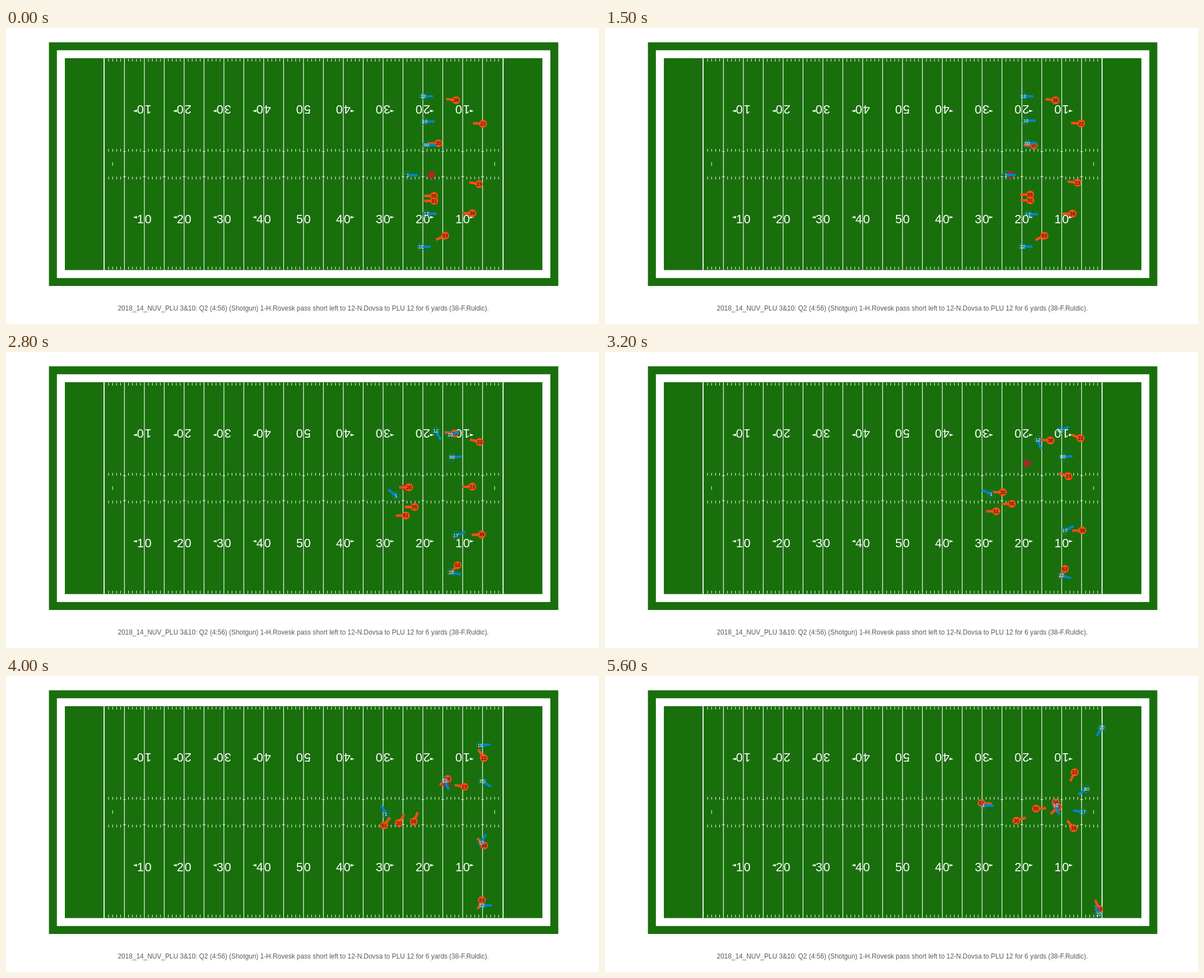
These frames come from a looping animation (1058x529 px, 5.7 s). An HTML page:

```html
<!DOCTYPE html>
<html lang="en">
<head>
<meta charset="utf-8">
<title>Play animation</title>
<style>
  html, body { margin: 0; width: 100%; height: 100%; overflow: hidden; background: #fff; }
  svg { display: block; width: 100vw; height: 100vh; }
  text { font-family: "Liberation Sans", Arial, sans-serif; text-anchor: middle; }
</style>
</head>
<body>
<svg id="stage" viewBox="0 0 1058 529"></svg>
<script>
const LOOP = 5700, STEP = 100;
const GREEN = '#196f0c', ORANGE = '#fb4f14', BLUE = '#0085ca', BROWN = '#a52a2a';
const stage = document.getElementById('stage');

function add(parent, tag, attrs = {}, label) {
  const el = document.createElementNS('http://www.w3.org/2000/svg', tag);
  for (const key in attrs) el.setAttribute(key, attrs[key]);
  if (label !== undefined) el.textContent = label;
  parent.append(el);
  return el;
}

// ---- Field, measured in yards from its centre ----
const YARD = 7.1, MID_X = 531, MID_Y = 243.3;
const HALF_LENGTH = 60 * YARD, HALF_WIDTH = 80 / 3 * YARD;
const TOP = MID_Y - HALF_WIDTH, BOTTOM = MID_Y + HALF_WIDTH;
const yardX = yard => MID_X + (yard - 50) * YARD;

function drawGround() {
  for (const [margin, fill] of [[4, GREEN], [2, '#fff'], [0, GREEN]]) {
    const w = HALF_LENGTH + margin * YARD, h = HALF_WIDTH + margin * YARD;
    add(stage, 'rect', { x: MID_X - w, y: MID_Y - h, width: 2 * w, height: 2 * h, fill });
  }
}

function drawLines() {
  const full = x => `M${x} ${TOP}V${BOTTOM}`;
  const tick = 4.8, hash = 22.4;
  let lines = '', ticks = '';
  for (let yard = 1; yard < 100; yard++) {
    const x = yardX(yard);
    if (yard % 5 === 0) {
      lines += full(x - .2);
      ticks += `M${x - 2.7} ${MID_Y - hash}h5M${x - 2.7} ${MID_Y + hash}h5`;
    } else {
      for (const y of [TOP + 1.2, MID_Y - hash - tick, MID_Y + hash, BOTTOM - tick - 1.2])
        ticks += `M${x} ${y}v${tick}`;
    }
  }
  for (const yard of [2, 98]) ticks += `M${yardX(yard)} ${MID_Y - 3.2}v6.4`;
  const stroke = (d, width) => add(stage, 'path', { d, stroke: '#fff', 'stroke-width': width });
  stroke(full(yardX(0) - 1) + full(yardX(100) + .8), 1.8);
  stroke(lines, 1.15);
  stroke(ticks, 1);
}

function drawNumbers() {
  for (let yard = 10; yard <= 90; yard += 10) {
    const label = String(Math.min(yard, 100 - yard));
    const side = Math.sign(yard - 50);
    for (const turn of [0, 180]) {
      const g = add(stage, 'g', { fill: '#fff', transform: `translate(${yardX(yard) - .3} ${MID_Y}) rotate(${turn})` });
      [...label].forEach((digit, i) =>
        add(g, 'text', { x: i ? 6.9 : -6.9, y: 105.6, 'font-size': 21.8 }, digit));
      const dir = turn ? -side : side;
      if (dir) add(g, 'path', { d: `M${dir * 20} 95l${-dir * 7} -2.2v4.4z` });
    }
  }
}

drawGround();
drawLines();
drawNumbers();
add(stage, 'text', { x: 530.4, y: 505, 'font-size': 11.88, fill: '#595959' },
  '2018_14_NUV_PLU 3&10: Q2 (4:56) (Shotgun) 1-H.Rovesk pass short left to 12-N.Dovsa to PLU 12 for 6 yards (38-F.Ruldic).');

// ---- Routes: still until the snap, then a smooth run through four points ----
const MOMENTS = [1150, 2300, 4000, 5600];

function smooth(values) {
  const gap = i => MOMENTS[i + 1] - MOMENTS[i];
  const rate = i => (values[i + 1] - values[i]) / gap(i);
  const inner = i => (gap(i) * rate(i - 1) + gap(i - 1) * rate(i)) / (gap(i - 1) + gap(i));
  const slopes = [0, inner(1), inner(2), rate(2) / 2];
  return t => {
    const i = t < MOMENTS[1] ? 0 : t < MOMENTS[2] ? 1 : 2;
    const h = gap(i), u = Math.max(0, (t - MOMENTS[i]) / h), v = 1 - u;
    return values[i] * (1 + 2 * u) * v * v + values[i + 1] * (3 - 2 * u) * u * u
      + h * u * v * (slopes[i] * v - slopes[i + 1] * u);
  };
}

function route(points) {
  const x = smooth(points.map(p => p[0])), y = smooth(points.map(p => p[1]));
  return t => [x(t), y(t)];
}

// ---- Headings, each a rule of a player's route and the time ----
const progress = (t, from, to) => Math.min(1, Math.max(0, (t - from) / (to - from)));
const angle = (a, b) => Math.atan2(b[1] - a[1], b[0] - a[0]);
const upfield = () => 0;
const backfield = () => Math.PI;
const alongRun = (at, t) => angle(at(t - STEP), at(t));
const facing = target => (at, t) => angle(at(t), target(t));

function turn(before, after, from, to) {
  return (at, t) => {
    const u = progress(t, from, to), a = before(at, t), diff = after(at, t) - a;
    return a + Math.atan2(Math.sin(diff), Math.cos(diff)) * u * u * (3 - 2 * u);
  };
}

// ---- Ball: snapped, held, thrown, carried ----
const SPOT = [759, 262.5], SNAP = 950, HELD = 1650, THROW = 2650, CATCH = 3450;
const ball = add(stage, 'circle', { r: 6.8, fill: BROWN });

function ballAt(t) {
  const mix = (a, b, u) => a.map((value, i) => value + (b[i] - value) * u);
  const carried = time => mix(receiver(time), [2, 5].map((d, i) => receiver(time)[i] + d), 1);
  if (t < HELD) return mix(SPOT, passer(HELD), progress(t, SNAP, HELD));
  if (t < THROW) return passer(t);
  if (t < CATCH) return mix(passer(THROW), carried(CATCH), progress(t, THROW, CATCH));
  return carried(t);
}

// ---- Players ----
function team(dotStyle, lineColor, textColor) {
  const [lines, dots, labels] = [0, 1, 2].map(() => add(stage, 'g'));
  return { lines, dots, labels, dotStyle, lineColor, textColor };
}
const defense = team({ r: 7.1, fill: ORANGE }, ORANGE, '#000');
const offense = team({ r: 6.6, fill: 'none', stroke: BLUE, 'stroke-width': 1 }, BLUE, '#fff');
const players = [];

function player(side, number, heading, ...points) {
  const at = route(points);
  players.push({
    at, heading,
    parts: [
      add(side.dots, 'circle', side.dotStyle),
      add(side.labels, 'text', { y: 3.1, 'font-size': 8.6, fill: side.textColor }, number)
    ],
    line: add(side.lines, 'path', { d: 'M0 0H17.8', stroke: side.lineColor, 'stroke-width': 4.4 })
  });
  return at;
}

const toBall = facing(ballAt);
const attack = turn(turn(upfield, alongRun, 2000, 3000), toBall, 3700, 4900);
const rush = turn(backfield, toBall, 3300, 4200);
const cover = mark => turn(facing(mark), toBall, 3700, 4900);

const receiver = player(offense, 12, attack, [744, 122], [760, 128], [783, 187], [804, 231]);
const wideLeft = player(offense, 10, attack, [747, 167], [773, 156], [846, 124], [886, 92]);
player(offense, 80, attack, [750, 209], [775, 192], [850, 188], [859, 202]);
const passer = player(offense, 1, attack, [717, 263], [704, 260], [678, 247], [675.5, 231]);
const slotRight = player(offense, 17, attack, [750, 332], [783, 334], [848, 298], [853, 243]);
const wideRight = player(offense, 22, attack, [740, 391], [773, 390], [849, 410], [881, 426]);

player(defense, 38, cover(receiver), [803, 129], [804.5, 134.5], [788, 184], [804, 226]);
player(defense, 22, cover(wideLeft), [851, 171], [843.5, 167], [852.5, 146.5], [838, 172]);
player(defense, 20, rush, [771.5, 206], [733, 231], [701, 262.5], [734, 258.5]);
player(defense, 23, toBall, [844, 279], [837, 259], [818, 198], [808, 234]);
player(defense, 55, rush, [763.5, 300], [736, 284], [727.5, 260], [769, 237]);
player(defense, 51, rush, [764, 309], [731, 300], [674.5, 267], [672, 227]);
player(defense, 39, cover(slotRight), [832, 331], [844.5, 332], [853, 303], [836, 272]);
player(defense, 53, cover(wideRight), [783.5, 371], [792, 375], [849, 400.5], [881.5, 416.5]);

function render(t) {
  ball.setAttribute('transform', `translate(${ballAt(t)})`);
  for (const { at, heading, parts, line } of players) {
    const place = `translate(${at(t)})`;
    for (const part of parts) part.setAttribute('transform', place);
    line.setAttribute('transform', `${place} rotate(${heading(at, t) * 180 / Math.PI})`);
  }
}

const start = performance.now();
function tick() {
  const t = (performance.now() - start) % LOOP;
  render(Math.floor(t / STEP) * STEP);
  requestAnimationFrame(tick);
}
tick();
</script>
</body>
</html>
```
